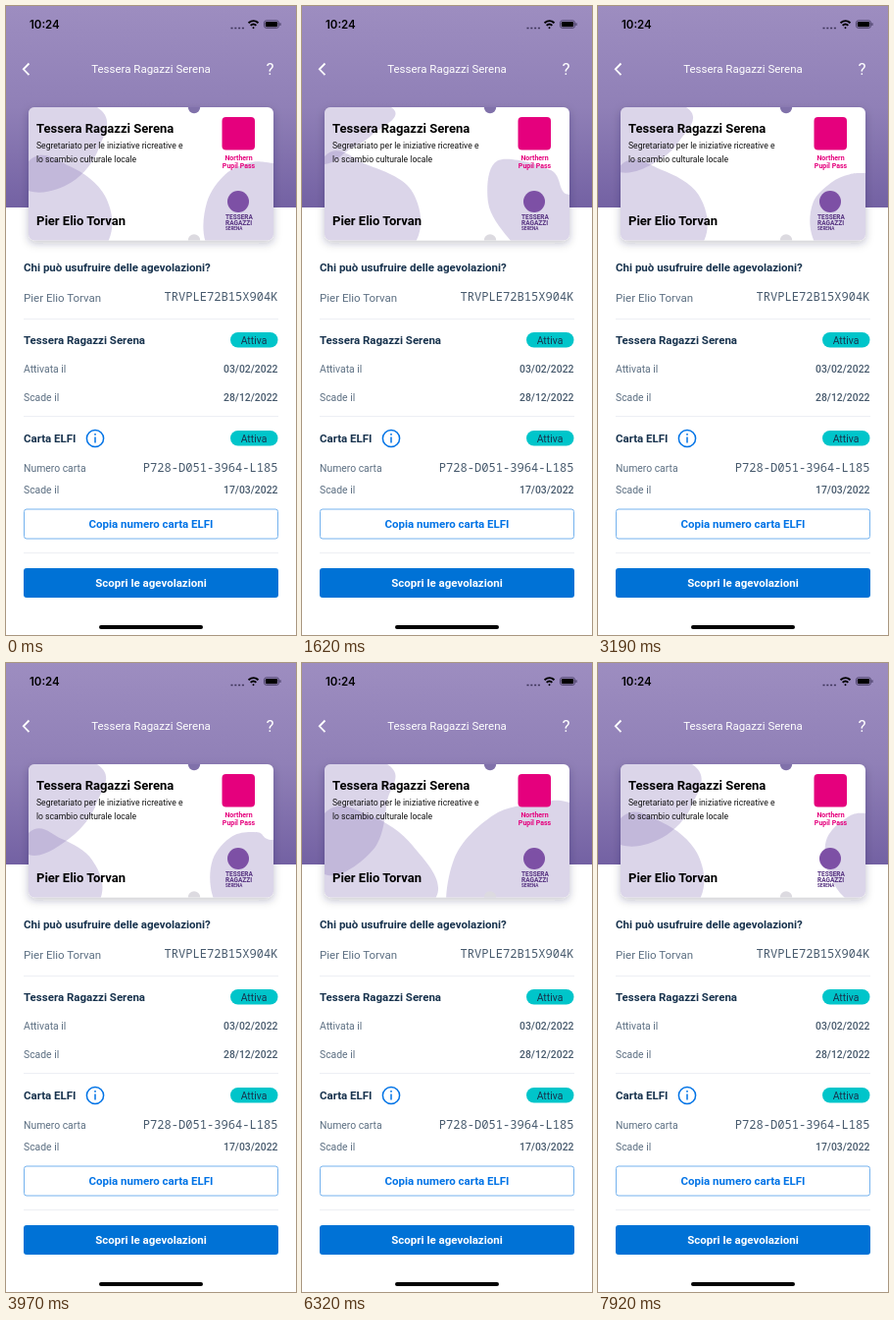
Recreate the animation shown at these times as an HTML page. Size 296x640 px, loop 8000 ms.

```html
<!DOCTYPE html>
<html lang="it">
<head>
<meta charset="utf-8">
<style>
  html, body { margin: 0; width: 100%; height: 100%; overflow: hidden; background: #fff; }
  svg { display: block; width: 100%; height: 100%; font: 11.5px Roboto, sans-serif; fill: #17324d; }
  .bold { font-weight: 700; }
  .title { font-size: 13px; font-weight: 700; fill: #000; }
  .small { font-size: 8.6px; fill: #111; }
  .label { fill: #5c6f82; }
  .row { font-size: 10.4px; }
  .value { font-weight: 500; fill: #475a6d; }
  .code { font: 12.1px "Noto Sans Mono", monospace; fill: #475a6d; }
  .end { text-anchor: end; }
  .mid { text-anchor: middle; }
  .white { fill: #fff; }
  .line { stroke: #edeff4; }
  .pass { font-size: 7px; font-weight: 700; fill: #e5007d; }
  .mark { font-size: 6.5px; font-weight: 700; fill: #54307f; }
</style>
</head>
<body>
<svg viewBox="0 0 296 640">
  <defs>
    <linearGradient id="sky" x2="0" y2="1">
      <stop stop-color="#9d8dc0"/>
      <stop offset=".5" stop-color="#9080b7"/>
      <stop offset="1" stop-color="#7361a3"/>
    </linearGradient>
    <clipPath id="cardShape"><rect x="23" y="103" width="250" height="135.5" rx="6"/></clipPath>
    <filter id="shadow" x="-20%" y="-20%" width="140%" height="150%">
      <feDropShadow dx="0" dy="3" stdDeviation="4" flood-color="#221a3c" flood-opacity=".25"/>
    </filter>
    <g id="pill">
      <rect x="229" width="48.5" height="15.5" rx="7.75" fill="#00c5ca"/>
      <text class="row mid" x="253" y="11.6">Attiva</text>
    </g>
  </defs>

  <rect width="296" height="205" fill="url(#sky)"/>

  <!-- Status bar -->
  <text x="24" y="22.5" fill="#000" style="font:600 11.5px Inter,sans-serif">10:24</text>
  <path d="M229.5 22.5h14" stroke="#3c3358" stroke-width="1.6" stroke-dasharray="2 1.8"/>
  <g fill="none" stroke="#000" stroke-width="1.8">
    <path d="M247.5 17.3q5-4.4 10 0M249.6 19.8q2.9-2.5 5.8 0"/>
    <path d="M251.7 22.2h1.6"/>
  </g>
  <rect x="263.5" y="14.8" width="15" height="7.6" rx="2.3" fill="none" stroke="#3c3358" stroke-width=".8"/>
  <rect x="264.8" y="16" width="12.4" height="5.2" rx="1.2" fill="#000"/>
  <path d="M280 17.3v2.6" stroke="#3c3358"/>

  <!-- Navigation -->
  <path d="M23.5 58.5l-5.7 5.8 5.7 5.8" fill="none" stroke="#fff" stroke-width="1.8"/>
  <text class="white mid" x="148" y="68">Tessera Ragazzi Serena</text>
  <text class="white mid" x="269.5" y="70" style="font-size:17px">?</text>

  <!-- Card -->
  <rect x="23" y="103" width="250" height="135.5" rx="6" fill="#fff" filter="url(#shadow)"/>
  <g clip-path="url(#cardShape)">
    <g id="blobs" fill="#8875b5" fill-opacity=".3"></g>
    <circle cx="192" cy="103" r="6.2" fill="#8071aa"/>
    <circle cx="192" cy="238.5" r="6.2" fill="#dcdae0"/>
  </g>
  <text class="title" x="31" y="129">Tessera Ragazzi Serena</text>
  <text class="small" x="31" y="144.5">Segretariato per le iniziative ricreative e</text>
  <text class="small" x="31" y="158.5">lo scambio culturale locale</text>
  <text class="title" x="31" y="223">Pier Elio Torvan</text>
  <rect x="220.5" y="113" width="33.5" height="33.5" rx="4" fill="#e5007d"/>
  <text class="pass mid" x="237.5" y="157">Northern</text>
  <text class="pass mid" x="237.5" y="165">Pupil Pass</text>
  <circle cx="237" cy="199" r="11" fill="#7d50a5"/>
  <text class="mark" x="224" y="217">TESSERA</text>
  <text class="mark" x="224" y="222.7">RAGAZZI</text>
  <text class="mark" x="224" y="227.5" style="font-size:4.6px">SERENA</text>

  <!-- Holder -->
  <text class="bold" x="18" y="270">Chi può usufruire delle agevolazioni?</text>
  <text class="label" x="18" y="301">Pier Elio Torvan</text>
  <text class="code end" x="277.5" y="300">TRVPLE72B15X904K</text>
  <path class="line" d="M18 318.5h260M18 417.5h260M18 556.5h260"/>

  <!-- First card -->
  <text class="bold" x="18" y="344">Tessera Ragazzi Serena</text>
  <use href="#pill" y="332"/>
  <text class="label row" x="18" y="373">Attivata il</text>
  <text class="value row end" x="277.5" y="373">03/02/2022</text>
  <text class="label row" x="18" y="401.5">Scade il</text>
  <text class="value row end" x="277.5" y="401.5">28/12/2022</text>

  <!-- Second card -->
  <text class="bold" x="18" y="444">Carta ELFI</text>
  <g fill="none" stroke="#0073e6" stroke-width="1.5">
    <circle cx="91" cy="440" r="8.6"/>
    <path d="M91 438.4v6.1M91 435.1v1.7"/>
  </g>
  <use href="#pill" y="432"/>
  <text class="label row" x="18" y="473.5">Numero carta</text>
  <text class="code end" x="277.5" y="474">P728-D051-3964-L185</text>
  <text class="label row" x="18" y="495.5">Scade il</text>
  <text class="value row end" x="277.5" y="495.5">17/03/2022</text>

  <!-- Buttons -->
  <rect x="18.5" y="512" width="259" height="30" rx="2.5" fill="#fff" stroke="#74b2ee"/>
  <text class="bold mid" x="148" y="531" style="fill:#0073e6">Copia numero carta ELFI</text>
  <rect x="18" y="572" width="260" height="30" rx="3" fill="#0072d6"/>
  <text class="bold white mid" x="148" y="591">Scopri le agevolazioni</text>
  <rect x="95" y="630" width="106" height="4" rx="2" fill="#000"/>
</svg>

<script>
const LOOP = 8000;
const TIMES = [0, 1620, 2460, 3970, 5390, 6320, 7920];

// Each blob is a closed curve around a centre: radii every 30 degrees
// (clockwise, 0 = right), one row per key time.
const STEP = 30;
const BLOBS = [
  { x: 23, y: 103, from: 0, anchors: [[-20, 150], [-20, 70]], radii: [
    [70, 83, 88, 85], [68, 56, 50, 58], [60, 55, 45, 40], [70, 80, 86, 92],
    [27, 50, 62, 60], [64, 74, 100, 112], [73, 84, 86, 82]] },
  { x: 23, y: 238, from: -90, anchors: [[60, 290], [-20, 250]], radii: [
    [80, 86, 90, 82], [85, 88, 102, 94], [85, 95, 108, 97], [65, 68, 75, 74],
    [55, 62, 78, 78], [85, 95, 104, 114], [80, 87, 90, 82]] },
  { x: 273, y: 200, from: 90, anchors: [[330, 170], [330, 230]], radii: [
    [90, 85, 80, 68, 57, 47, 40], [60, 68, 72, 83, 85, 38, 8],
    [70, 65, 58, 50, 41, 37, 40], [90, 82, 72, 62, 48, 32, 20],
    [90, 90, 75, 58, 53, 56, 65], [100, 130, 140, 118, 90, 66, 58],
    [50, 44, 40, 41, 45, 46, 47]] }
];

const group = document.getElementById('blobs');
for (const blob of BLOBS) {
  blob.path = document.createElementNS('http://www.w3.org/2000/svg', 'path');
  group.append(blob.path);
}

// Smooth interpolation through unevenly spaced keys
function valueAt(values, time) {
  const last = TIMES.length - 1;
  const t = Math.min(time, TIMES[last]);
  let i = 0;
  while (i < last - 1 && t > TIMES[i + 1]) i++;
  const slope = k => {
    const a = Math.max(k - 1, 0), b = Math.min(k + 1, last);
    return (values[b] - values[a]) / (TIMES[b] - TIMES[a]);
  };
  const span = TIMES[i + 1] - TIMES[i];
  const u = (t - TIMES[i]) / span, v = 1 - u;
  return v * v * (1 + 2 * u) * values[i] + u * u * (3 - 2 * u) * values[i + 1]
    + span * u * v * (v * slope(i) - u * slope(i + 1));
}

function smoothPath(points) {
  const n = points.length;
  const at = i => points[(i + n) % n];
  let d = `M${at(0)}`;
  for (let i = 0; i < n; i++) {
    const [a, b, c, e] = [at(i - 1), at(i), at(i + 1), at(i + 2)];
    const lead = b.map((p, k) => p + (c[k] - a[k]) / 6);
    const trail = c.map((p, k) => p - (e[k] - b[k]) / 6);
    d += `C${lead} ${trail} ${c}`;
  }
  return d + 'Z';
}

function draw(time) {
  for (const { x, y, from, anchors, radii, path } of BLOBS) {
    const edge = radii[0].map((_, i) => {
      const r = valueAt(radii.map(row => row[i]), time);
      const angle = (from + STEP * i) * Math.PI / 180;
      return [x + r * Math.cos(angle), y + r * Math.sin(angle)];
    });
    path.setAttribute('d', smoothPath([...edge, ...anchors]));
  }
}

const start = performance.now();
function frame() {
  draw((performance.now() - start) % LOOP);
  requestAnimationFrame(frame);
}
frame();
</script>
</body>
</html>
```
